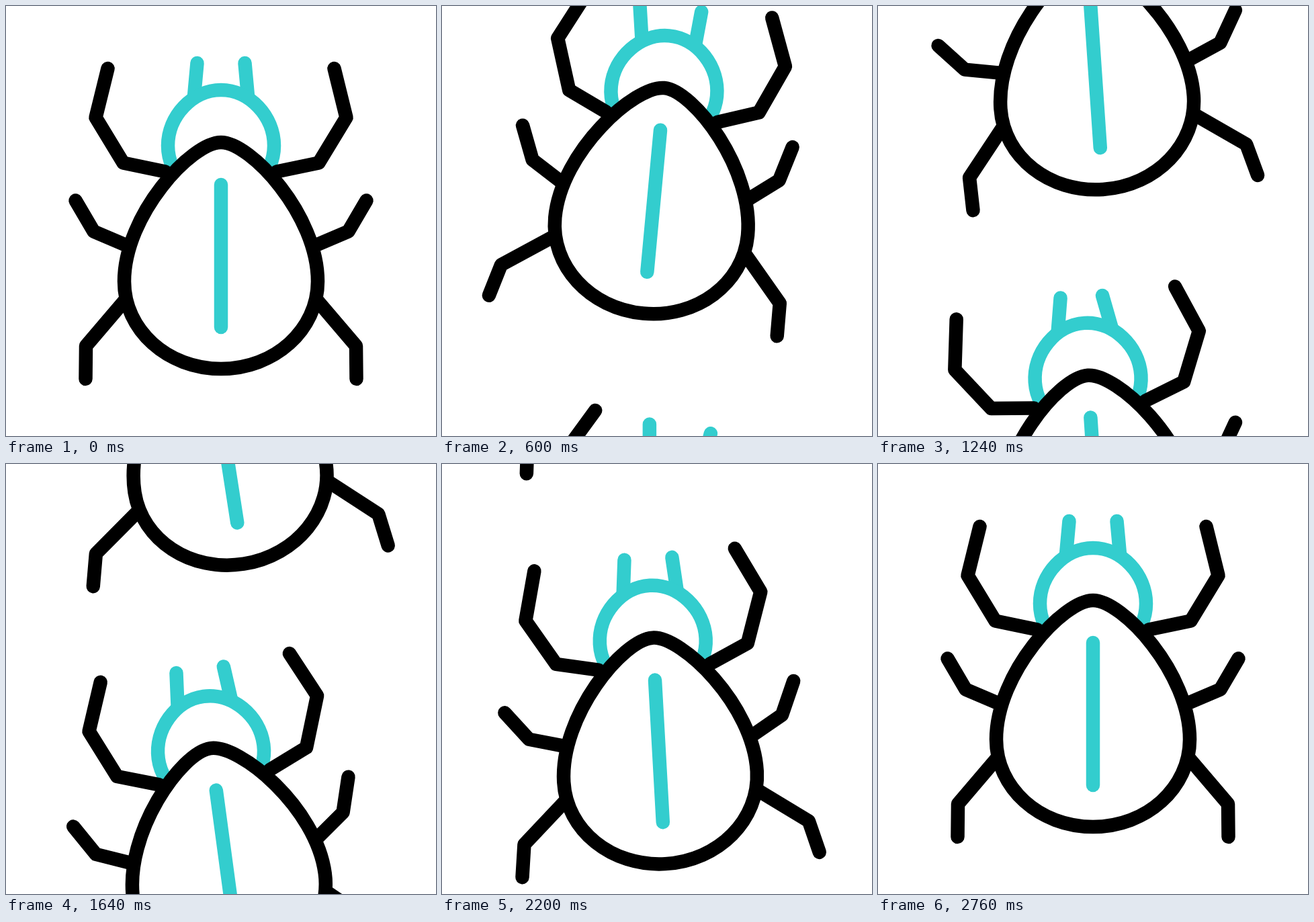
Animation of 640 by 640 pixels, one loop 3000 ms. Source, as an HTML page with a canvas:

```html
<!DOCTYPE html>
<html lang="en">
<head>
<meta charset="utf-8">
<title>Crawling beetle</title>
<style>
  html, body { margin: 0; width: 100%; height: 100%; overflow: hidden; background: #fff; }
  canvas { display: block; width: 640px; height: 640px; }
</style>
</head>
<body>
<canvas id="stage" width="640" height="640"></canvas>
<script>
const ctx = document.getElementById('stage').getContext('2d');
const LOOP = 3000, STEP = 40, CENTER = 320;
const TEAL = '#33cdce', BLACK = '#000';

const head = new Path2D('M248 240C243 229 241 219 241 208C241 164 277.5 125 320 125' +
  'C362.5 125 399 164 399 208C399 219 397 229 392 240');
const shell = new Path2D('M320 203C276 203 176 311 176 410C176 482 240 540 320 540' +
  'C400 540 464 482 464 410C464 311 364 203 320 203Z');
const spine = new Path2D('M320 266V478');

// Left-side limbs; the first point is the joint, the right side is mirrored.
const antenna = [[280, 134], [284.5, 85]];
const legs = [
  { points: [[237, 246.5], [174.5, 233.5], [133.5, 166], [151.5, 93]], left: 65, right: -18, swing: 14 },
  { points: [[181, 357], [130.5, 335.5], [103.5, 289.5]], left: 30, right: -62, swing: 14.5 },
  { points: [[177, 438], [119, 506], [118.5, 555]], left: 90, right: 11, swing: 16 }
];

const clamp = (v, lo, hi) => Math.min(hi, Math.max(lo, v));
const rad = deg => deg * Math.PI / 180;

function smooth(t, from, to) {
  const u = clamp((t - from) / (to - from), 0, 1);
  return u * u * (3 - 2 * u);
}

// Eases between [time, value] keys.
function track(t, keys) {
  let value = keys[0][1];
  for (let i = 1; i < keys.length; i++)
    value += (keys[i][1] - keys[i - 1][1]) * smooth(t, keys[i - 1][0], keys[i][0]);
  return value;
}

// cubic-bezier(1/6, 0, 5/6, 1)
function glide(t, from, to) {
  const u = clamp((t - from) / (to - from), 0, 1);
  let lo = 0, hi = 1;
  for (let i = 0; i < 24; i++) {
    const s = (lo + hi) / 2, r = 1 - s;
    if (s * r * r / 2 + 2.5 * s * s * r + s * s * s < u) lo = s; else hi = s;
  }
  return lo * lo * (3 - 2 * lo);
}

function stroke(path, color) {
  ctx.strokeStyle = color;
  ctx.stroke(path);
}

function limb(points, mirrored, angle, color) {
  const [jx, jy] = points[0];
  const path = new Path2D();
  points.forEach(([x, y]) => path.lineTo(x - jx, y - jy));
  ctx.save();
  if (mirrored) {
    ctx.translate(2 * CENTER, 0);
    ctx.scale(-1, 1);
  }
  ctx.translate(jx, jy);
  ctx.rotate(rad(mirrored ? -angle : angle));
  stroke(path, color);
  ctx.restore();
}

// The left legs slow down towards the end of the walk.
function legAngle(t, leg, mirrored) {
  const time = clamp(t, 350, 2440) - 1960;
  const period = mirrored ? 500 : time > 0 ? 548 : 490;
  const fade = smooth(t, 160, 350) * (1 - smooth(t, 2440, 2760));
  const phase = mirrored ? leg.right : leg.left;
  return fade * leg.swing * Math.cos(rad(360 * time / period - phase));
}

function beetle(t, offset, turn) {
  ctx.save();
  ctx.translate(CENTER, CENTER + offset);
  ctx.rotate(rad(turn));
  ctx.translate(-CENTER, -CENTER);
  limb(antenna, false, track(t, [[160, 0], [600, -14], [1240, 3], [1600, 0]]), TEAL);
  limb(antenna, true, track(t, [[160, 0], [600, 10.5], [1240, -7], [1600, 0]]), TEAL);
  stroke(head, TEAL);
  for (const leg of legs)
    for (const mirrored of [false, true])
      limb(leg.points, mirrored, legAngle(t, leg, mirrored), BLACK);
  ctx.fill(shell);
  stroke(shell, BLACK);
  stroke(spine, TEAL);
  ctx.restore();
}

function draw(now) {
  const t = Math.floor(now % LOOP / STEP) * STEP;
  ctx.fillStyle = '#fff';
  ctx.fillRect(0, 0, 640, 640);
  ctx.lineWidth = 20.5;
  ctx.lineCap = ctx.lineJoin = 'round';
  beetle(t, -640 * glide(t, 160, 2670),
    track(t, [[160, 0], [400, 6.2], [1800, -9.4], [2600, 0]]));
  beetle(t, 629 * (1 - glide(t, 160, 2520)),
    track(t, [[160, 0], [580, 8.8], [1550, -7.8], [2710, 0]]));
  requestAnimationFrame(() => draw(performance.now() - start));
}

const start = performance.now();
draw(0);
</script>
</body>
</html>
```
